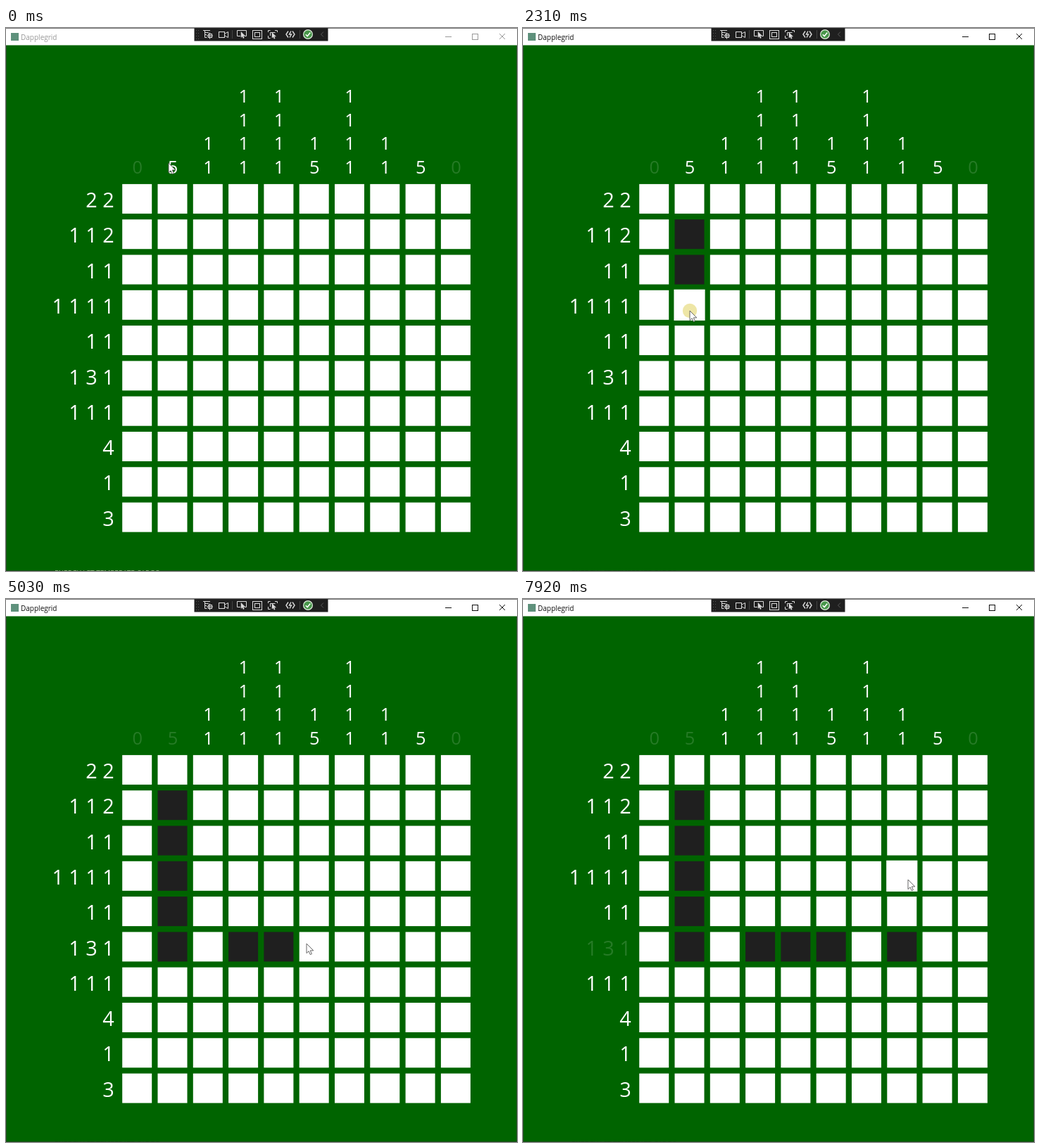
Animation, 726 px wide and 772 px high, one loop 8 s. Source, as an HTML page with a canvas:

```html
<!DOCTYPE html>
<html lang="en">
<head>
<meta charset="utf-8">
<title>Dapplegrid</title>
<style>
  html, body { margin: 0; width: 100%; height: 100%; overflow: hidden; background: #006400; }
  canvas { display: block; }
</style>
</head>
<body>
<canvas id="stage" width="726" height="772"></canvas>
<script>
const ctx = document.getElementById('stage').getContext('2d');
const W = 726, H = 772, LOOP = 8000;
const N = 10, PITCH = 50.3, SIZE = 42, LEFT = 165.2, TOP = 221.9;
const FONT = '"Open Sans", "Noto Sans", sans-serif';
const ICON = '#dcdcdc', BAR = '#1f1f1f';
const COLS = '0,5,1 1,1 1 1 1,1 1 1 1,1 5,1 1 1 1,1 1,5,0'.split(',');
const ROWS = '2 2,1 1 2,1 1,1 1 1 1,1 1,1 3 1,1 1 1,4,1,3'.split(',');

// A press shows a disc for HOLD ms and flips its cell after FLIP ms.
const FLIP = 60, HOLD = 100, HOVER_LAG = 55, MS_PER_PX = 3.2;
const moves = [], presses = [];
const go = (at, x, y) => moves.push({ at, x, y });
const press = at => presses.push(at);

// Wander over the first column
go(300, 186, 297);
go(870, 184, 357);
go(1140, 237, 303);
// Fill the second column downwards
for (let k = 0; k < 3; k++) {
  const at = 1720 + k * 275;
  if (k) go(at - 175, 237, 303 + k * 49.5);
  press(at);
}
go(2370, 238, 440);
press(2800);
go(3100, 237, 487);
press(3380);
// Fill the sixth row to the right
go(3910, 332, 488);
press(4410);
go(4620, 380, 489);
press(4820);
go(4910, 430, 490);
press(5080);
// Overshoot, undo, correct
go(5175, 584, 491);
press(5880);
press(6540);
go(6650, 545, 490);
press(6930);
go(7460, 547, 399);

function pointer(t) {
  let x = 231, y = 192;
  for (const m of moves) {
    if (t < m.at) break;
    const time = MS_PER_PX * Math.hypot(m.x - x, m.y - y);
    const p = Math.min(1, (t - m.at) / time);
    const e = 1 - (1 - p) ** 2;
    x += (m.x - x) * e;
    y += (m.y - y) * e;
  }
  return { x, y };
}

function cellAt({ x, y }) {
  const c = Math.floor((x - LEFT) / PITCH), r = Math.floor((y - TOP) / PITCH);
  const inside = c >= 0 && c < N && r >= 0 && r < N &&
    x - LEFT - c * PITCH <= SIZE && y - TOP - r * PITCH <= SIZE;
  return inside ? r * N + c : -1;
}

function filledCells(t) {
  const cells = new Set();
  for (const at of presses) {
    if (t < at + FLIP) break;
    const id = cellAt(pointer(at));
    if (!cells.delete(id)) cells.add(id);
  }
  return cells;
}

function solved(clue, cells, idOf) {
  let line = '';
  for (let k = 0; k < N; k++) line += cells.has(idOf(k)) ? '#' : ' ';
  const runs = line.split(' ').filter(Boolean).map(run => run.length).join(' ');
  return (runs || '0') === clue;
}

function rect(x, y, w, h, color) {
  ctx.fillStyle = color;
  ctx.fillRect(x, y, w, h);
}

function frame(x, y, w, h, color) {
  ctx.strokeStyle = color;
  ctx.lineWidth = 1;
  ctx.strokeRect(x + 0.5, y + 0.5, w - 1, h - 1);
}

function line(d, color, width = 1) {
  ctx.strokeStyle = color;
  ctx.lineWidth = width;
  ctx.stroke(new Path2D(d));
}

function disc(x, y, r, color) {
  ctx.fillStyle = color;
  ctx.beginPath();
  ctx.arc(x, y, r, 0, Math.PI * 2);
  ctx.fill();
}

function text(str, x, y, size, color, align = 'left') {
  ctx.font = `${size}px ${FONT}`;
  ctx.textAlign = align;
  ctx.fillStyle = color;
  ctx.fillText(str, x, y);
}

const ARROW = new Path2D('M0 0V13.6L3.1 10.7L5.2 15.6L7.4 14.7L5.3 9.9H9.8Z');
function arrow(x, y, scale, fill, edge) {
  ctx.save();
  ctx.translate(x, y);
  ctx.scale(scale, scale);
  ctx.fillStyle = fill;
  ctx.fill(ARROW);
  ctx.strokeStyle = edge;
  ctx.lineWidth = 0.9;
  ctx.stroke(ARROW);
  ctx.restore();
}

function titleBar(active) {
  const ink = active ? '#111' : '#999';
  rect(0, 0, W, 24.5, '#fff');
  rect(0, 0, W, 0.6, '#222');
  rect(7, 7, 11, 11, '#5f917c');
  text('Dapplegrid', 21, 16.5, 10, ink);
  line('M624 12.5h9M701 8l8 8m0 -8l-8 8', ink);
  frame(662, 8, 9, 9, ink);
}

function toolbar() {
  rect(267.5, 0, 190, 18.5, BAR);
  for (let i = 0; i < 8; i++) rect(270 + (i % 2) * 3, 3 + (i >> 1) * 4, 1, 1, '#555');
  // Tree, camera
  line('M280 3.5h10M282 6.5h6M282.5 3v10.5h3M282 9.5h3M285 11h9M289.5 6.5v9', ICON);
  frame(287, 8, 6, 6, ICON);
  frame(302, 5, 9, 9, ICON);
  line('M311 8l4.5 -2.5v8l-4.5 -2.5', ICON);
  // Selection tools
  line('M333 11.5h-4.5v-8h13v8h-2.5', ICON);
  arrow(334, 5.5, 0.58, ICON, ICON);
  frame(350, 3, 14, 13, ICON);
  frame(353, 6, 8, 7, ICON);
  line('M372.5 6v-2.5h3M382 3.5h3.5v2.5M372.5 11v3.5h3M375.5 11v-4.5h7', ICON);
  arrow(378, 6.5, 0.56, ICON, ICON);
  // Reload, status, collapse
  line('M401 4.5l-3 4.5l3 4.5m6 -9l3 4.5l-3 4.5M405 4.5l-2.5 4.5h3l-2.5 4.5', ICON, 1.4);
  for (const x of [321, 417]) rect(x, 3, 1, 12, '#444');
  disc(429, 9, 7, '#e2eee0');
  disc(429, 9, 5.8, '#48964a');
  line('M425.8 9.2l2.4 2.4l4.2 -5', '#fff', 1.5);
  line('M451 5.5l-3.5 3.5l3.5 3.5', '#5a5a5a');
}

function clues(cells) {
  const ink = done => done ? 'rgba(255,255,255,.15)' : '#fff';
  COLS.forEach((clue, c) => {
    const color = ink(solved(clue, cells, r => r * N + c));
    clue.split(' ').reverse().forEach((n, k) =>
      text(n, LEFT + SIZE / 2 + 0.6 + c * PITCH, 207 - k * 33.6, 25.4, color, 'center'));
  });
  ROWS.forEach((clue, r) => {
    const color = ink(solved(clue, cells, c => r * N + c));
    text(clue, 153.7, 255 + r * PITCH, 28.8, color, 'right');
  });
}

function board(cells, hover) {
  for (let id = 0; id < N * N; id++) {
    const full = cells.has(id), grow = id === hover && !full ? 1.1 : 0;
    const x = LEFT + (id % N) * PITCH, y = TOP + Math.floor(id / N) * PITCH;
    rect(x - grow, y - grow, SIZE + 2 * grow, SIZE + 2 * grow, full ? BAR : '#fff');
  }
}

function draw(t) {
  const active = t >= presses[0];
  const pos = pointer(t), cells = filledCells(t);
  rect(0, 0, W, H, '#006400');
  frame(0, 0, W, H, '#1c4a1c');
  text('ENERGY LET TEMPERATE CARGO', 69, 778.5, 10,
    active ? 'rgba(20,50,20,.4)' : 'rgba(225,235,200,.65)');
  titleBar(active);
  toolbar();
  clues(cells);
  board(cells, cellAt(pointer(t - HOVER_LAG)));
  if (presses.some(at => t >= at && t < at + HOLD))
    disc(pos.x, pos.y, 10.2, cells.has(cellAt(pos)) ? '#6a971e' : '#eee6a6');
  arrow(pos.x, pos.y, 1, '#fff', '#555');
}

function tick() {
  draw(performance.now() % LOOP);
  requestAnimationFrame(tick);
}
tick();
</script>
</body>
</html>
```
